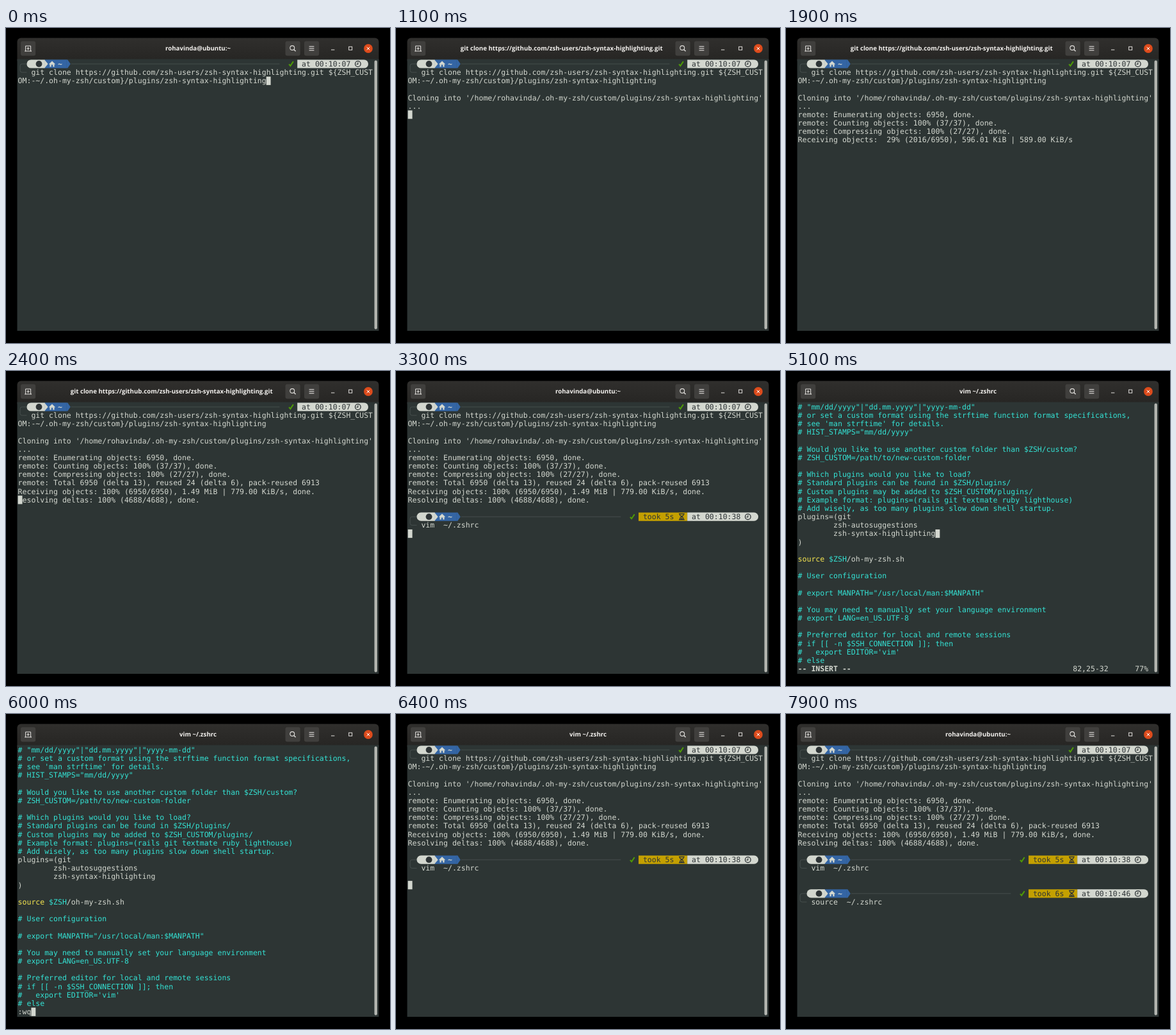
Recreate the animation shown at these times as an HTML page with a canvas. Size 600 px wide and 491 px high, loop 8000 ms.

```html
<!DOCTYPE html>
<html lang="en">
<head>
<meta charset="utf-8">
<title>Terminal</title>
<style>
html, body { margin: 0; width: 100%; height: 100%; overflow: hidden; background: #000; }
canvas { display: block; width: 600px; height: 491px; }
</style>
</head>
<body>
<canvas id="stage"></canvas>
<script>
const W = 600, H = 491, LOOP = 8000;
const X0 = 18.6, Y0 = 49.4, CW = 6.93, RH = 13.17;
const MONO = '"DejaVu Sans Mono", monospace';
const BG = '#2d3534', FG = '#d3d7cf', DARK = '#2e3436', LINE = '#485150';
const BLUE = '#3465a4', GOLD = '#c4a000', GREEN = '#4e9a06';
const CYAN = '#34e2d4', YELLOW = '#f5e550', TEAL = '#06989a';

const canvas = document.getElementById('stage');
const ctx = canvas.getContext('2d');
const dpr = window.devicePixelRatio || 1;
canvas.width = W * dpr;
canvas.height = H * dpr;
ctx.scale(dpr, dpr);
ctx.textRendering = 'geometricPrecision';

const cx = col => X0 + col * CW;
const cy = row => Y0 + row * RH;

// Latest entry of a [time, ...values] list that has started
const at = (list, t) => list.reduce((a, b) => (b[0] <= t ? b : a));

function text(row, col, str, color = FG, bold = false) {
  ctx.font = (bold ? 'bold ' : '') + '11.5px ' + MONO;
  ctx.textAlign = 'left';
  ctx.fillStyle = color;
  [...str].forEach((ch, i) => {
    if (ch !== ' ') ctx.fillText(ch, cx(col + i), cy(row) + 10.5);
  });
}

function cells(row, col, n, color) {
  ctx.fillStyle = color;
  ctx.fillRect(cx(col), cy(row), n * CW, RH);
}

function block(row, col, ch, bg, fg) {
  cells(row, col, 1, bg);
  text(row, col, ch, fg);
}

function poly(points, color) {
  ctx.beginPath();
  points.forEach(([x, y]) => ctx.lineTo(x, y));
  ctx.closePath();
  ctx.fillStyle = color;
  ctx.fill();
}

function stroke(points, color, width) {
  ctx.beginPath();
  points.forEach(([x, y]) => ctx.lineTo(x, y));
  ctx.strokeStyle = color;
  ctx.lineWidth = width;
  ctx.stroke();
}

function ring(x, y, r, color, width) {
  ctx.beginPath();
  ctx.arc(x, y, r, 0, 7);
  ctx.strokeStyle = color;
  ctx.lineWidth = width;
  ctx.stroke();
}

function disc(x, y, r, color) {
  ctx.beginPath();
  ctx.arc(x, y, r, 0, 7);
  ctx.fillStyle = color;
  ctx.fill();
}

function box(x, y, w, h, r, color) {
  ctx.beginPath();
  ctx.roundRect(x, y, w, h, r);
  ctx.fillStyle = color;
  ctx.fill();
}

// Window chrome

function frame(title) {
  ctx.fillStyle = '#000';
  ctx.fillRect(0, 0, W, H);
  const bar = ctx.createLinearGradient(0, 15, 0, 49);
  bar.addColorStop(0, '#302f2d');
  bar.addColorStop(1, '#272624');
  box(17.5, 15.5, 565, 36, [6, 6, 0, 0], bar);
  ctx.fillStyle = BG;
  ctx.fillRect(17.5, 48.5, 565, 423.5);
  box(575.6, 50.5, 4.4, 419, 2.2, '#b2b4af');

  [23, 436.5, 466].forEach(x => box(x, 20.5, 23.2, 22.8, 3, '#403f3d'));
  const ink = '#e4e2df';
  stroke([[29.5, 36], [30.6, 36], [30.6, 28], [38.6, 28], [38.6, 36], [39.8, 36]], ink, 1);
  stroke([[29.5, 36], [39.8, 36]], ink, 1);
  stroke([[34.6, 29.8], [34.6, 34.2]], ink, 1);
  stroke([[32.4, 32], [36.8, 32]], ink, 1);
  ring(447.3, 31, 3.4, ink, 1.1);
  stroke([[449.8, 33.5], [452.6, 36.3]], ink, 1.3);
  [28.8, 31.8, 34.8].forEach(y => stroke([[473.6, y], [481.4, y]], ink, 1.1));
  stroke([[508, 34], [513.4, 34]], ink, 1);
  ctx.strokeRect(535.7, 29.2, 5, 5);
  disc(566, 32, 6.9, '#dd4b1c');
  stroke([[563.7, 29.7], [568.3, 34.3]], '#fff', 1);
  stroke([[568.3, 29.7], [563.7, 34.3]], '#fff', 1);

  ctx.font = 'bold 9.7px "Open Sans", sans-serif';
  ctx.textAlign = 'center';
  ctx.fillStyle = '#f2f0ed';
  ctx.fillText(title, title.length > 40 ? 258.7 : 300, 35.2);
}

// Shell prompt

function home(x, y) {
  poly([[x - 5.2, y + .4], [x, y - 4.6], [x + 5.2, y + .4], [x + 3.6, y + .4],
    [x + 3.6, y + 4.4], [x + 1.2, y + 4.4], [x + 1.2, y + 1.2], [x - 1.2, y + 1.2],
    [x - 1.2, y + 4.4], [x - 3.6, y + 4.4], [x - 3.6, y + .4]], FG);
}

function hourglass(x, y) {
  stroke([[x - 4.4, y - 4.5], [x + 4.4, y - 4.5]], DARK, 1.4);
  stroke([[x - 4.4, y + 4.5], [x + 4.4, y + 4.5]], DARK, 1.4);
  stroke([[x - 3, y - 4], [x - 2.6, y - 2], [x + 2.6, y + 2], [x + 3, y + 4]], DARK, 1.2);
  stroke([[x + 3, y - 4], [x + 2.6, y - 2], [x - 2.6, y + 2], [x - 3, y + 4]], DARK, 1.2);
  poly([[x - 2.4, y - 1.8], [x + 2.4, y - 1.8], [x, y]], DARK);
  poly([[x - 2.8, y + 4], [x + 2.8, y + 4], [x, y + 1.8]], DARK);
}

function prompt(row, time, took) {
  const top = cy(row), mid = top + RH / 2, low = top + RH;
  const left = cx(.5), end = took ? 48 : 59;

  ctx.beginPath();
  ctx.moveTo(cx(2), mid);
  ctx.arcTo(left, mid, left, low, 3);
  ctx.arcTo(left, mid + RH, cx(2), mid + RH, 3);
  ctx.lineTo(cx(2), mid + RH);
  ctx.strokeStyle = LINE;
  ctx.lineWidth = .9;
  ctx.stroke();
  stroke([[cx(12), mid], [cx(end), mid]], LINE, .9);

  cells(row, 6, 5, BLUE);
  poly([[cx(11) - .3, top], [cx(11) + 1.5, top], [cx(12) - 1, mid], [cx(11) + 1.5, low], [cx(11) - .3, low]], BLUE);
  box(cx(2), top, 4 * CW + .4, RH, [RH / 2, 0, 0, RH / 2], FG);
  poly([[cx(6), top], [cx(7) - 1.5, mid], [cx(6), low]], FG);
  disc(51.5, mid, 4.9, DARK);
  home(72, mid);
  text(row, 9, '~', FG, true);

  const k = cx(end + 2);
  stroke([[k + .8, mid + .4], [k + 3, mid + 3], [k + 7.6, mid - 3.8]], GREEN, 2);

  if (took) {
    cells(row, 52, 11, GOLD);
    text(row, 53, 'took ' + took, DARK);
    hourglass(446.4, mid);
  }
  box(cx(63), top, 16 * CW, RH, [0, RH / 2, RH / 2, 0], FG);
  text(row, 64, 'at ' + time, DARK);
  ring(549.9, mid, 4.3, DARK, 1.3);
  stroke([[549.9, mid - 2.8], [549.9, mid + .4], [547.6, mid + .4]], DARK, 1.1);
}

// Shell session: [time, row, text]

const OUTPUT = [
  [0, 1, '   git clone https://github.com/zsh-users/zsh-syntax-highlighting.git ${ZSH_CUST'],
  [0, 2, 'OM:-~/.oh-my-zsh/custom}/plugins/zsh-syntax-highlighting'],
  [500, 4, "Cloning into '/home/rohavinda/.oh-my-zsh/custom/plugins/zsh-syntax-highlighting'"],
  [500, 5, '...'],
  [1300, 6, 'remote: Enumerating objects: 6950, done.'],
  [1400, 7, 'remote: Counting objects: 100% (37/37), done.'],
  [1400, 8, 'remote: Compressing objects: 100% (27/27), done.'],
  [2200, 9, 'remote: Total 6950 (delta 13), reused 24 (delta 6), pack-reused 6913'],
  [2200, 10, 'Receiving objects: 100% (6950/6950), 1.49 MiB | 779.00 KiB/s, done.'],
  [2800, 14, '   vim  ~/.zshrc'],
  [7000, 18, '   source  ~/.zshrc']
];

function receiving(t) {
  const step = Math.floor((t - 1900) / 100);
  const n = Math.max(70, 2016 + step * 486);
  const pct = String(Math.floor(n / 69.5)).padStart(3);
  const rate = step < -2 ? '' : `, ${(596.01 + step * 96).toFixed(2)} KiB | ${589 + step * 12}.00 KiB/s`;
  return `Receiving objects: ${pct}% (${n}/6950)${rate}`;
}

function shell(t) {
  prompt(0, '00:10:07');
  OUTPUT.forEach(([start, row, str]) => t >= start && text(row, 0, str));
  if (t >= 1500 && t < 2200) text(9, 0, receiving(t));
  if (t >= 2300) {
    text(11, 0, t < 2400 ? 'Resolving deltas:  42% (1969/4688)' : 'Resolving deltas: 100% (4688/4688), done.');
  }
  if (t >= 2600) prompt(13, '00:10:38', '5s');
  if (t >= 6700) prompt(17, '00:10:46', '6s');
}

// Editor

const HEAD = `# "mm/dd/yyyy"|"dd.mm.yyyy"|"yyyy-mm-dd"
# or set a custom format using the strftime function format specifications,
# see 'man strftime' for details.
# HIST_STAMPS="mm/dd/yyyy"

# Would you like to use another custom folder than $ZSH/custom?
# ZSH_CUSTOM=/path/to/new-custom-folder

# Which plugins would you like to load?
# Standard plugins can be found in $ZSH/plugins/
# Custom plugins may be added to $ZSH_CUSTOM/plugins/
# Example format: plugins=(rails git textmate ruby lighthouse)
# Add wisely, as too many plugins slow down shell startup.
plugins=(git
        zsh-autosuggestions`.split('\n');

const TAIL = `)

source $ZSH/oh-my-zsh.sh

# User configuration

# export MANPATH="/usr/local/man:$MANPATH"

# You may need to manually set your language environment
# export LANG=en_US.UTF-8

# Preferred editor for local and remote sessions
# if [[ -n $SSH_CONNECTION ]]; then
#   export EDITOR='vim'
# else
#   export EDITOR='mvim'`.split('\n');

const STATUS = [
  [3600, '"~/.zshrc" 115L, 4368C', '82,1', '78%'],
  [4500, '-- INSERT --', '82,1', '77%'],
  [4700, '-- INSERT --', '82,2-9', '77%'],
  [4800, '-- INSERT --', '82,25-32', '77%'],
  [5400, '', '82,24-31', '77%'],
  [5700, ':', '', ''],
  [5900, ':w', '', ''],
  [6000, ':wq', '', ''],
  [6200, '"~/.zshrc" 116L, 4393C written', '82,24-31', '77%']
];

function editor(t) {
  const added = t < 4500 ? [] : [t < 4800 ? '' : '        zsh-syntax-highlighting'];
  [...HEAD, ...added, ...TAIL].slice(0, 31).forEach((str, row) => {
    if (str.startsWith('source')) {
      text(row, 0, 'source', YELLOW);
      text(row, 7, '$ZSH', CYAN);
      text(row, 11, '/oh-my-zsh.sh');
    } else {
      text(row, 0, str, str[0] === '#' ? CYAN : FG);
    }
  });
  if (t >= 4000 && t < 4500) block(13, 8, '(', TEAL, FG);
  const [, message, pos, pct] = at(STATUS, t);
  text(31, 0, message, FG, message[0] === '-');
  text(31, 62, pos);
  text(31, 76, pct);
}

// [time, row, column, character below]; row -1 hides the cursor
const CURSOR = [
  [0, 2, 56], [100, 3, 0], [500, 6, 0], [1000, -1], [1100, 6, 0], [1300, 7, 0],
  [1400, 9, 0], [1700, -1], [2200, 11, 0], [2600, 14, 3], [2800, 14, 16],
  [3100, 15, 0], [3500, 16, 0], [3600, 15, 0, ')'], [4500, 15, 0], [4700, 15, 8],
  [4800, 15, 31], [5400, 15, 30, 'g'], [5700, 31, 1], [5900, 31, 2], [6000, 31, 3],
  [6200, 15, 30, 'g'], [6300, 16, 0], [6700, 18, 3], [7000, 18, 19],
  [7200, 19, 0], [7400, 20, 0], [7700, -1]
];

const IDLE = 'rohavinda@ubuntu:~';
const TITLES = [
  [0, IDLE],
  [300, 'git clone https://github.com/zsh-users/zsh-syntax-highlighting.git'],
  [2500, IDLE],
  [3500, 'vim ~/.zshrc'],
  [6600, IDLE],
  [7400, 'source ~/.zshrc'],
  [7600, IDLE]
];

function draw(t) {
  frame(at(TITLES, t)[1]);
  (t >= 3600 && t < 6300 ? editor : shell)(t);
  const [, row, col, ch = ''] = at(CURSOR, t);
  if (row >= 0) block(row, col, ch, FG, BG);
}

const began = performance.now();
let shown = -1;
function tick() {
  const t = Math.floor(((performance.now() - began) % LOOP) / 100) * 100;
  if (t !== shown) draw(shown = t);
  requestAnimationFrame(tick);
}
tick();
</script>
</body>
</html>
```
